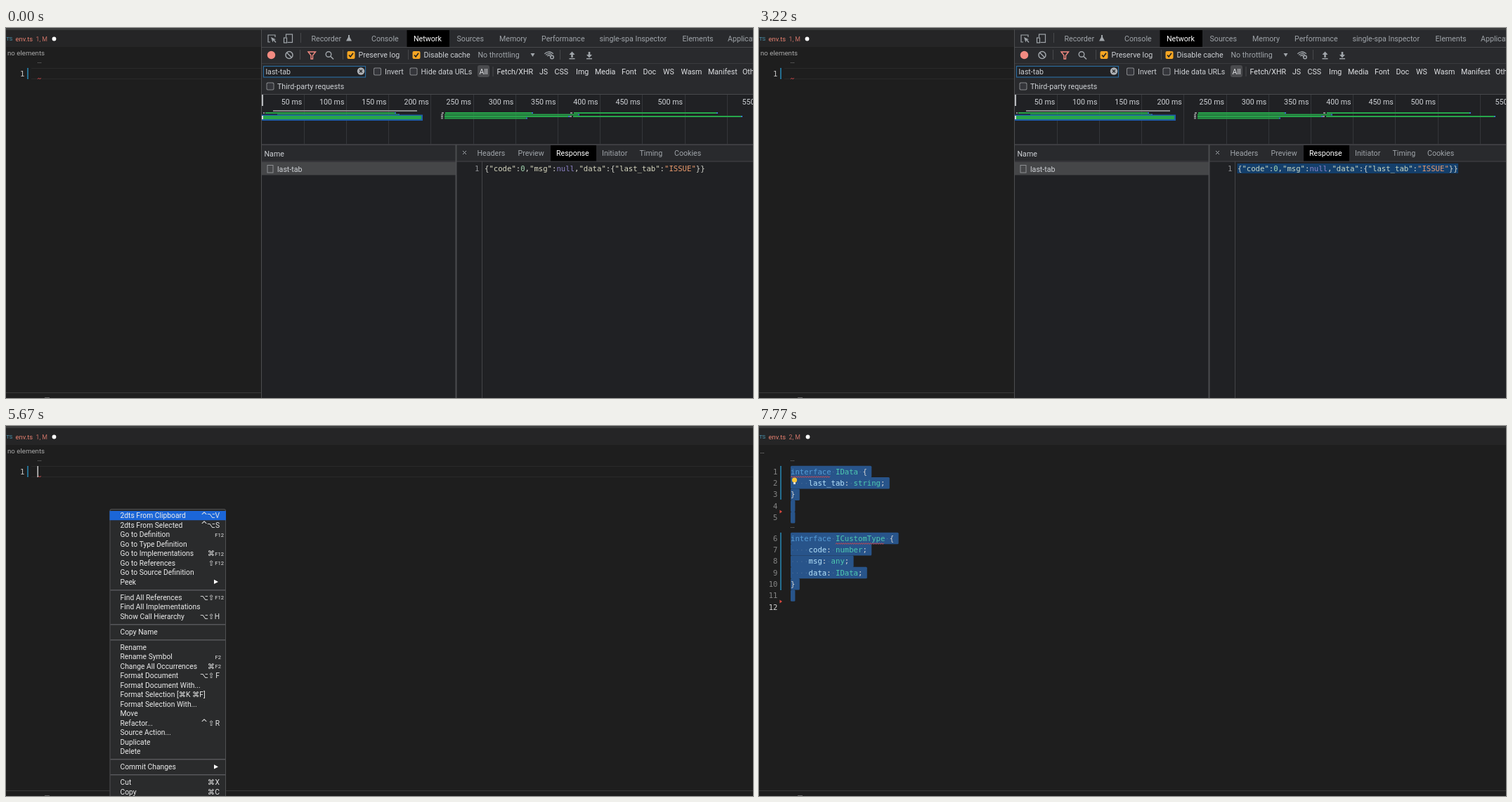
An HTML page with a canvas that plays this animation: 1063x527 px, repeating every 8 s.

```html
<!DOCTYPE html>
<html lang="en">
<head>
<meta charset="utf-8">
<title>JSON response to TypeScript types</title>
<style>
html, body { margin: 0; width: 100%; height: 100%; overflow: hidden; background: #1e1e1e; }
canvas { display: block; }
</style>
</head>
<body>
<canvas id="stage" width="1063" height="527"></canvas>
<script>
const ctx = document.getElementById('stage').getContext('2d');
const W = 1063, H = 527, LOOP = 8000, TICK = 70;
const UI = 'Roboto, "DejaVu Sans", sans-serif';
const MONO = '"DejaVu Sans Mono", monospace';
const CODE_SIZE = 10.64, CHAR = 6.4;

// When each state begins, in ms
const AT = { select: 1890, caretOff: 2520, editor: 3290, menu: 4900, hover: 5390,
             pick: 6930, fade: 7000, insert: 7350, checked: 7770 };

function rect(x, y, w, h, color) {
  ctx.fillStyle = color;
  ctx.fillRect(x, y, w, h);
}

function text(s, x, y, color, size = 10.65, font = UI, align = 'left') {
  ctx.font = size + 'px ' + font;
  ctx.textAlign = align;
  ctx.fillStyle = color;
  ctx.fillText(s, x, y + size * 0.35);
}

function path(points, color, width = 1.2, fill = false, close = fill) {
  ctx.beginPath();
  points.forEach(([x, y], i) => i ? ctx.lineTo(x, y) : ctx.moveTo(x, y));
  if (close) ctx.closePath();
  if (fill) { ctx.fillStyle = color; ctx.fill(); }
  else { ctx.strokeStyle = color; ctx.lineWidth = width; ctx.stroke(); }
}

function circle(x, y, r, color, width = 0) {
  ctx.beginPath();
  ctx.arc(x, y, r, 0, Math.PI * 2);
  if (width) { ctx.strokeStyle = color; ctx.lineWidth = width; ctx.stroke(); }
  else { ctx.fillStyle = color; ctx.fill(); }
}

function box(x, y, w, h, color, width = 1) {
  ctx.strokeStyle = color;
  ctx.lineWidth = width;
  ctx.strokeRect(x, y, w, h);
}

function rounded(x, y, w, h, r, color) {
  ctx.beginPath();
  ctx.roundRect(x, y, w, h, r);
  ctx.fillStyle = color;
  ctx.fill();
}

function squiggle(x0, x1, y) {
  const points = [];
  for (let x = x0, i = 0; x <= x1; x += 1.6, i++) points.push([x, y + (i % 2 ? -0.9 : 0.9)]);
  path(points, '#e0484a', 0.9);
}

function gutterBar(y, h) {
  for (let i = 0; i < h; i += 2) {
    rect(30, y + i, 2, 1, '#2b86b0');
    rect(30, y + i + 1, 2, 1, '#1d5670');
  }
}

// Draws [string, color] runs side by side on the character grid
function code(runs, x, y) {
  for (const [s, color] of runs) {
    text(s, x, y, color, CODE_SIZE, MONO);
    x += s.length * CHAR;
  }
}

/* ---------- editor ---------- */

const KEY = '#569cd6', TYPE = '#4ec9b0', VAR = '#b5e2fb', PUN = '#d4d4d4';
const field = (name, type) => [['    ' + name, VAR], [': ', PUN], [type, TYPE], [';', PUN]];
const head = name => [['interface ', KEY], [name, TYPE], [' {', PUN]];
const END = [['}', PUN]];
const LINES = [head('IData'), field('last_tab', 'string'), END, [], [],
  head('ICustomType'), field('code', 'number'), field('msg', 'any'), field('data', 'IData'), END, [], []];

const lineY = i => i < 5 ? 65 + i * 16.3 : 160 + (i - 5) * 16.3;

function drawTypes(t) {
  const checked = t >= AT.checked;
  LINES.forEach((runs, i) => {
    const y = lineY(i), s = runs.map(r => r[0]).join('');
    if (i < 11) rounded(45, y - 8.2, (s.length + 1) * CHAR, 16.5, 1.5, '#28548a');
    [...s].forEach((c, n) => {
      if (c === ' ') rect(45 + (n + 0.4) * CHAR, y, 1, 1, '#5578a0');
    });
    code(runs, 45, y);
    text(String(i + 1), 26.5, y, i === 11 ? '#d0d0d0' : '#858585', CODE_SIZE, MONO, 'right');
  });
  gutterBar(57, 48);
  gutterBar(152, 82);
  for (const y of [122, 250]) path([[29.5, y - 2.5], [33, y], [29.5, y + 2.5]], '#d9483f', 1, true);
  text('…', 44.5, 141.5, '#999', 9.5);
  if (checked) {
    squiggle(45, 102, 72.5);
    squiggle(109, 179, 167.5);
    circle(50.5, 77, 3.6, '#f8c535');
    rect(49, 80, 3, 3, '#d8d8d8');
  } else {
    rect(45, lineY(11) - 8, 1.5, 16, '#ccc');
  }
}

function drawEditor(t) {
  const inserted = t >= AT.insert, checked = t >= AT.checked;
  rect(0, 0, W, H, '#1e1e1e');
  rect(0, 3, W, 24, '#252526');
  rect(0, 0, W, 3, '#3b3c3c');
  rect(0, 519, W, 1, '#383838');
  rect(55, 526, 7, 1, '#666');
  text('TS', 0.5, 15.5, '#4e9cb8', 7.4);
  text('env.ts', 13.5, 15.5, '#e88070', 9.4);
  text((checked ? '2' : '1') + ', M', 42.5, 15.5, '#c46f64', 8.8);
  circle(checked ? 69.5 : 68.5, 15.5, 2.9, '#fff');
  text('…', 44.5, 46.5, '#999', 9.5);
  if (inserted) {
    text('…', 1.5, 36, '#aaa', 9.5);
    drawTypes(t);
    return;
  }
  text('no elements', 2, 36, '#a9a9a9', 9.7);
  rect(36, 57, W, 1, '#292929');
  rect(36, 72, W, 1, '#292929');
  text('1', 26.5, 65, '#c6c6c6', CODE_SIZE, MONO, 'right');
  gutterBar(57, 16);
  squiggle(45, 51, 72);
  const blinkOff = t >= 3920 && t < 4410;
  if (t >= AT.editor && !blinkOff) rect(44.5, 57, 1.5, 16, '#c8c8c8');
}

/* ---------- context menu ---------- */

const MENU = ['2dts From Clipboard|^⌥V', '2dts From Selected|^⌥S', 'Go to Definition|F12',
  'Go to Type Definition', 'Go to Implementations|⌘F12', 'Go to References|⇧F12',
  'Go to Source Definition', 'Peek|▶', '-', 'Find All References|⌥⇧F12',
  'Find All Implementations', 'Show Call Hierarchy|⌥⇧H', '-', 'Copy Name', '-', 'Rename',
  'Rename Symbol|F2', 'Change All Occurrences|⌘F2', 'Format Document|⌥⇧F',
  'Format Document With...', 'Format Selection [⌘K ⌘F]', 'Format Selection With...', 'Move',
  'Refactor...|^⇧R', 'Source Action...', 'Duplicate', 'Delete', '-', 'Commit Changes|▶', '-',
  'Cut|⌘X', 'Copy|⌘C'];

function drawShortcut(keys, y) {
  const fn = keys.match(/F\d+$/);
  if (keys === '▶') {
    path([[296, y - 3.2], [302, y], [296, y + 3.2]], '#fff', 1, true);
    return;
  }
  if (fn) text(fn[0], fn[0] === 'F2' ? 306 : 310, y + 0.6, '#e6e6e6', 7.6, UI, 'right');
  else text(keys.slice(-1), 304, y, '#e6e6e6', 10.3, UI, 'right');
  const mods = [...(fn ? keys.slice(0, fn.index) : keys.slice(0, -1))].reverse();
  mods.forEach((c, i) => text(c, 292 - i * 10, y, '#e6e6e6', c === '^' ? 12 : 10.3, '"DejaVu Sans", sans-serif', 'center'));
}

function drawMenu(t) {
  const alpha = t < AT.fade ? 1 : Math.max(0, (7224 - t) / 280);
  if (t < AT.menu || !alpha) return;
  ctx.globalAlpha = alpha;
  if (alpha === 1) {
    rounded(147.5, 118, 165.5, 420, 3, '#505152');
    rounded(148.5, 119, 163.5, 420, 2, '#2a2b2c');
  }
  if (t >= AT.hover && t !== AT.pick) rect(147.5, 121, 165.5, 13.2, '#1b66d8');
  let y = 127.4;
  for (const item of MENU) {
    if (item === '-') {
      if (alpha === 1) rect(148.5, Math.round(y - 2.5), 163.5, 1.5, '#56575a');
      y += 8.5;
      continue;
    }
    const [label, keys] = item.split('|');
    text(label, 162.5, y, '#ececec', 10.3);
    if (keys) drawShortcut(keys, y);
    y += 13.5;
  }
  ctx.globalAlpha = 1;
}

/* ---------- network panel ---------- */

const DIM = '#a0a5aa', LIT = '#cdd0d4', EDGE = '#48494c', BAR = '#292a2d', GREEN = '#27a64b';

const TABS = [['Recorder', 434.5], ['Console', 520], ['Network', 580], ['Sources', 641.5], ['Memory', 702],
  ['Performance', 762], ['single-spa Inspector', 844.5], ['Elements', 962.5], ['Application', 1027]];
const TYPES = [['All', 673.5], ['Fetch/XHR', 698.5], ['JS', 759], ['CSS', 780.5], ['Img', 811], ['Media', 838],
  ['Font', 876], ['Doc', 906.5], ['WS', 935], ['Wasm', 960.5], ['Manifest', 999], ['Other', 1048]];
const DETAILS = [['Headers', 670.5], ['Preview', 728.5], ['Response', 783], ['Initiator', 848],
  ['Timing', 901.5], ['Cookies', 951]];

function tabs(list, y, active) {
  for (const [name, x] of list) text(name, x, y, name === active ? '#fff' : DIM);
}

function check(x, y, label, on) {
  if (on) {
    rounded(x, y - 5.5, 11, 11, 2, '#f6a623');
    path([[x + 2.5, y], [x + 4.6, y + 2.4], [x + 8.5, y - 2.8]], '#222', 1.6);
  } else {
    rounded(x, y - 5.5, 11, 11, 2, '#85878a');
    rounded(x + 1, y - 4.5, 9, 9, 1.5, '#34353a');
  }
  text(label, x + 10.5, y, LIT);
}

function arrow(x, y, dir) {
  path([[x - 4, y], [x, y - 4.5 * dir], [x + 4, y]], DIM, 1, true);
  rect(x - 1.3, dir > 0 ? y : y - 4, 2.6, 4, DIM);
  rect(x - 4, y + 5, 8, 1.4, DIM);
}

function drawToolbar() {
  // pointer and device icons
  path([[376, 20], [373, 20], [373, 10], [383, 10], [383, 13]], DIM, 1.2);
  path([[377, 13], [384, 16.3], [380.8, 17], [379.5, 20.5]], DIM, 1, true);
  path([[381, 17], [384, 20.5]], DIM, 1.4);
  box(398.5, 9, 9, 11.5, DIM, 1.2);
  rect(394.5, 13, 6, 8.5, BAR);
  box(395.5, 14, 4, 7, DIM, 1.2);
  path([[486, 10], [490, 10], [489, 10], [489, 13], [492, 18.5], [484, 18.5], [487, 13], [487, 10]], DIM, 1, true);

  // record, clear, filter, search
  circle(377.5, 38.5, 5.7, '#f28b82');
  circle(403, 38.5, 5, DIM, 1.5);
  path([[399.5, 35], [406.5, 42]], DIM, 1.5);
  path([[430, 34], [440.5, 34], [436.5, 39], [436.5, 44], [434, 44], [434, 39]], '#f28b82', 1.4, false, true);
  circle(459, 37.5, 3.8, DIM, 1.4);
  path([[462, 40.5], [466, 44.5]], DIM, 1.6);
  for (const [x, y] of [[419, 14], [418, 38], [479, 38], [572, 38], [788, 38]]) rect(x, y - 7, 1, 14, EDGE);

  check(485.5, 38.5, '', true);
  text('Preserve log', 501.5, 38.5, LIT);
  check(578.5, 38.5, '', true);
  text('Disable cache', 594.5, 38.5, LIT);
  text('No throttling', 671.5, 38.5, DIM);
  path([[746.5, 36], [752.5, 36], [749.5, 41]], DIM, 1, true);
  for (const r of [3, 5.5, 8]) {
    ctx.beginPath();
    ctx.arc(772.5, 42, r, Math.PI * 1.22, Math.PI * 1.78);
    ctx.strokeStyle = DIM;
    ctx.lineWidth = 1.3;
    ctx.stroke();
  }
  circle(777, 41.5, 2.3, DIM, 1.5);
  arrow(805.5, 38, 1);
  arrow(830, 38, -1);
}

function drawFilter() {
  rect(366, 54, 146, 16, '#202124');
  box(366.5, 54.5, 145, 15.5, '#2a6a9c', 1.2);
  text('last-tab', 369.5, 62.5, LIT);
  circle(505, 61.5, 5.2, '#aeb1b5');
  path([[503, 59.5], [507, 63.5]], '#292a2d', 1.3);
  path([[507, 59.5], [503, 63.5]], '#292a2d', 1.3);
  check(523, 62, '', false);
  text('Invert', 539, 62, LIT);
  check(574.5, 62, '', false);
  text('Hide data URLs', 590.5, 62, LIT);
  rounded(671, 53, 17, 17, 3, '#4a4b4e');
  rect(692.5, 55, 1, 14, EDGE);
  for (const [name, x] of TYPES) text(name, x, 62, '#dfe1e4');
  check(370.5, 83, '', false);
  text('Third-party requests', 386, 83, LIT);
}

function drawOverview() {
  for (let i = 1; i <= 11; i++) {
    const x = 363.5 + i * 60.2;
    rect(Math.round(x), 95, 1, 70, '#34363a');
    text(i * 50 + ' ms', i === 11 ? 1083 : x - 2.5, 105, LIT, 10.65, UI, 'right');
  }
  rect(364, 95, 2, 16, '#b8babd');
  rect(380, 117, 205, 2, '#88898b');
  const bars = [[369, 553, 120], [386, 558, 122.5], [625, 748, 120], [624, 814, 122.5], [624, 800, 125],
    [624, 740, 127.5], [808, 1011, 120], [807, 1046, 125]];
  for (const [x0, x1, y] of bars) {
    rect(x0, y, x1 - x0, 2, GREEN);
    rect(x1, y, 2, 2, '#3a78c8');
    if (x0 > 600) rect(x0 - 5, y, 3, 2, '#8a8b8d');
  }
  rect(366, 120, 2, 2, '#8a8b8d');
  rect(364, 123.5, 229, 8.5, '#1d5fa8');
  rect(366, 125, 225, 5, GREEN);
  rect(364, 125, 2, 5, '#d4d8dc');
}

function drawResponse(t) {
  const selected = t >= AT.select;
  if (selected) rect(680.5, 193, 314.5, 14, '#143f6b');
  const pun = '#d2d3cb', key = selected ? '#c9d6c0' : '#d5d5bd';
  code([['{', pun], ['"code"', key], [':', pun], ['0', '#a3d6b0'], [',', pun], ['"msg"', key], [':', pun],
    ['null', '#8d83c8'], [',', pun], ['"data"', key], [':{', pun], ['"last_tab"', key], [':', pun],
    ['"ISSUE"', '#ea9a6c'], ['}}', pun]], 681, 200);
  if (selected && t < AT.caretOff) rect(994.5, 193, 1.2, 14, '#e8e8e8');
}

function drawNetwork(t) {
  const x = 364, w = W - x;
  rect(x, 3, w, H, '#202124');
  rect(x, 3, w, 91, BAR);
  rect(x, 27, w, 1, EDGE);
  rect(x, 50, w, 1, '#3a3b3e');
  rect(x, 94, w, 1, EDGE);
  rect(570.5, 3, 60.5, 24, '#000');
  tabs(TABS, 15, 'Network');
  drawToolbar();
  drawFilter();
  drawOverview();

  rect(x, 165.5, w, 1.2, '#505154');
  rect(x, 167, w, 22.5, BAR);
  rect(x, 189.5, w, 1, EDGE);
  text('Name', 367.5, 179.5, LIT);
  rect(x, 191, 276, 18.5, '#454648');
  box(372, 195.5, 8, 10.5, '#8e9093');
  text('last-tab', 386, 201, LIT);

  rect(775, 167, 65, 22.5, '#000');
  tabs(DETAILS, 178.5, 'Response');
  path([[650, 175], [655, 180]], DIM, 1);
  path([[655, 175], [650, 180]], DIM, 1);
  rect(639.5, 166, 2, H, '#4b4c4f');
  rect(677, 190, 1, H, '#434447');
  text('1', 673.5, 200, '#8b8e92', CODE_SIZE, MONO, 'right');
  drawResponse(t);
  rect(363, 2, 1, H, '#4c4d4f');
}

function frame(now) {
  const t = Math.floor((now % LOOP) / TICK) * TICK;
  drawEditor(t);
  if (t < AT.editor) drawNetwork(t);
  drawMenu(t);
  requestAnimationFrame(frame);
}

const start = performance.now();
const run = frame;
frame = now => run(Math.max(0, now - start));
requestAnimationFrame(frame);
</script>
</body>
</html>
```
